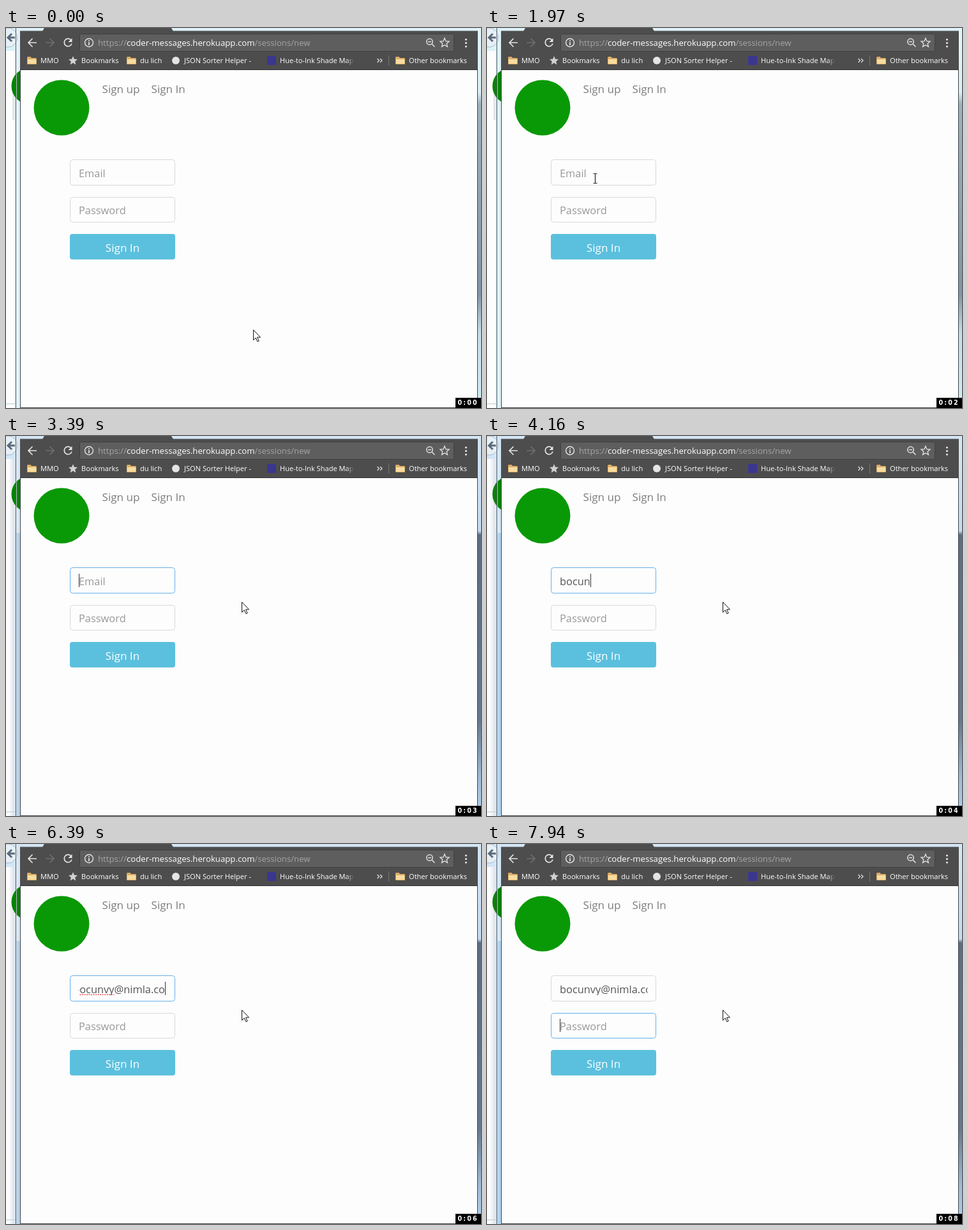
Animation, 744 px wide and 596 px high, one loop 8000 ms. Source, as an HTML page:

```html
<!DOCTYPE html>
<html lang="en">
<head>
<meta charset="utf-8">
<title>Sign in</title>
<style>
  html, body { margin: 0; width: 100%; height: 100%; overflow: hidden; background: #fdfdfd; }
  svg { display: block; }
  text { font-family: "Open Sans", "Noto Sans", sans-serif; white-space: pre; }
  .url { font-size: 13.2px; fill: #a5a5a5; }
  .bookmark { font-size: 11.1px; fill: #fff; }
  .nav { font-size: 17.1px; fill: #7c7c7c; }
  .field { font-size: 16.4px; fill: #999; }
  .typed { fill: #555; }
  .box { fill: #fdfdfd; stroke: #d9d9d9; }
  .box.focus { stroke: #66afe9; }
  .icon { fill: none; stroke: #e4e4e4; stroke-width: 1.7; }
  .clock { font: bold 9.6px "DejaVu Sans", sans-serif; letter-spacing: 2.1px; fill: #fff; }
</style>
</head>
<body>
<svg width="744" height="596" viewBox="0 0 744 596">
  <defs>
    <linearGradient id="idleGlass" x2="0" y2="1">
      <stop stop-color="#e2f5fa"/><stop offset=".17" stop-color="#d9eff6"/>
      <stop offset=".2" stop-color="#9fb2c0"/><stop offset=".7" stop-color="#8195a8"/>
      <stop offset=".8" stop-color="#c4dce8"/><stop offset="1" stop-color="#d3ecf5"/>
    </linearGradient>
    <linearGradient id="activeGlass" x2="0" y2="1">
      <stop stop-color="#d3e6f6"/><stop offset=".25" stop-color="#c4dbf0"/>
      <stop offset=".26" stop-color="#5d6d82"/><stop offset=".75" stop-color="#66788f"/>
      <stop offset=".9" stop-color="#9dbddb"/><stop offset="1" stop-color="#afd0ec"/>
    </linearGradient>
    <linearGradient id="shadow">
      <stop stop-color="#fdfdfd"/><stop offset="1" stop-color="#d9e0e8"/>
    </linearGradient>
    <linearGradient id="fade">
      <stop offset=".9" stop-color="#4d4d4d" stop-opacity="0"/><stop offset="1" stop-color="#4d4d4d"/>
    </linearGradient>
    <clipPath id="emailClip"><rect x="114" y="214" width="137.500" height="23"/></clipPath>
    <g id="folder">
      <path d="M0 1.5q0-1.500 1.500-1.500h4l1.500 2h6.500q1.500 0 1.500 1.500v7.500q0 1-1 1h-13q-1 0-1-1z" fill="#dcae68"/>
      <path d="M1 4h13v7h-13z" fill="#f7dca0"/>
    </g>
    <path id="star" d="M0-7l2 4.700 5 .4-3.800 3.300 1.200 5L0 3.700-4.400 6.400l1.200-5L-7-1.900l5-.4z"/>
  </defs>

  <!-- windows behind the browser -->
  <g id="idleFrame">
    <rect width="744" height="596" fill="#ddf2f8"/>
    <rect x="739" width="5" height="596" fill="url(#idleGlass)"/>
  </g>
  <g id="activeFrame">
    <rect width="744" height="596" fill="#d3e6f6"/>
    <rect x="16" y="152" width="6" height="444" fill="#b2d2ed"/>
    <rect x="739" width="5" height="596" fill="url(#activeGlass)"/>
  </g>
  <path d="M0 36h14v560H0z" fill="#fdfdfd"/>
  <path id="scrollEdge" d="M4 36h10v560H4z" fill="url(#shadow)"/>
  <path d="M10 95h4v49h-4z" fill="#e3e6e9"/>
  <path d="M0 589.5h14" stroke="#b9cbd5"/>
  <circle cx="3" cy="15" r="15" fill="#e6f0f6" stroke="#a9bbc8"/>
  <path d="M14 15H4m5-6-6 6 6 6" fill="none" stroke="#5a6a79" stroke-width="3"/>
  <circle cx="37" cy="91" r="28.500" fill="#088106"/>
  <path d="M15.500 0v596" stroke="#4b545b"/>
  <path d="M16.500 0v596" stroke="#fff" stroke-opacity=".6"/>

  <!-- browser -->
  <path d="M57 5l3-5h199l3 5z" fill="#4d4d4d"/>
  <path d="M22 66h717v530H22z" fill="#3e444a"/>
  <path d="M23 66h715v529H23z" fill="#fdfdfd"/>
  <path d="M22 4.500h717v61.500H22z" fill="#4d4d4d"/>
  <path d="M22 65.500h717" stroke="#343434"/>
  <rect x="115.500" y="9.500" width="586" height="27" rx="2" fill="#5e5e5e" stroke="#414141"/>
  <g class="icon">
    <path d="M48 23H35m6.500-6.500L35 23l6.500 6.500"/>
    <path d="M62 23h13m-6.500-6.500L75 23l-6.500 6.500" stroke="#6f6f6f"/>
    <path d="M102 19a6 6 0 1 0 1 5.500"/>
    <path d="M103.500 16v6h-6z" fill="#e4e4e4" stroke="none"/>
    <circle cx="130" cy="23" r="6.500" stroke-width="1.400"/>
    <path d="M130 19v1.700m0 1.300v5"/>
    <circle cx="663.500" cy="21.500" r="4.700" stroke-width="1.500"/>
    <path d="M661 21.500h5m1 3.500 4.500 4.500" stroke-width="1.500"/>
    <use href="#star" x="687" y="23" stroke-width="1.300"/>
    <path d="M599.500 43v16" stroke="#777" stroke-width="1"/>
    <path d="M581.500 48l3 3-3 3m4.500-6 3 3-3 3" stroke-width="1.200"/>
  </g>
  <g fill="#e4e4e4">
    <circle cx="720.500" cy="18" r="1.600"/><circle cx="720.500" cy="23.500" r="1.600"/><circle cx="720.500" cy="29" r="1.600"/>
    <use href="#star" x="105" y="51" fill="#d2d2d2"/>
    <circle cx="266" cy="51" r="6"/>
  </g>
  <text class="url" x="144" y="28">https://<tspan fill="#fff">coder-messages.herokuapp.com</tspan>/sessions/new</text>
  <use href="#folder" x="33" y="45"/>
  <use href="#folder" x="189" y="45"/>
  <use href="#folder" x="610" y="45"/>
  <rect x="409" y="44" width="14" height="14" fill="#3b3790"/>
  <g class="bookmark">
    <text x="54" y="55">MMO</text>
    <text x="118" y="55">Bookmarks</text>
    <text x="210" y="55">du lich</text>
    <text x="279" y="55">JSON Sorter Helper -</text>
    <text x="429" y="55">Hue-to-Ink Shade Map</text>
    <text x="631" y="55">Other bookmarks</text>
  </g>
  <rect x="279" y="42" width="115" height="18" fill="url(#fade)"/>
  <rect x="429" y="42" width="116" height="18" fill="url(#fade)"/>

  <!-- page -->
  <circle cx="87" cy="125" r="43.500" fill="#0a9906"/>
  <text class="nav" x="150.500" y="102">Sign up</text>
  <text class="nav" x="227.500" y="102">Sign In</text>
  <rect id="emailBox" class="box" x="100.500" y="206.500" width="164" height="40" rx="4"/>
  <rect id="passwordBox" class="box" x="100.500" y="265.500" width="164" height="39" rx="4"/>
  <text id="emailHint" class="field" x="114" y="234">Email</text>
  <g clip-path="url(#emailClip)">
    <g id="emailScroll">
      <text id="email" class="field typed" x="114" y="234"></text>
      <path id="squiggle" stroke="#e33" stroke-width="1.300" stroke-dasharray="2 1.500"/>
    </g>
  </g>
  <text class="field" x="114" y="292">Password</text>
  <rect x="100" y="323" width="165" height="40" rx="4" fill="#5bc0de"/>
  <text class="nav" x="182.500" y="351" text-anchor="middle" style="fill:#fff">Sign In</text>
  <path id="caret" d="M.5 0v21" stroke="#333"/>

  <g id="pointer">
    <path id="arrow" d="M.5.5v16l3.700-3.500 2.700 5.800 2.300-1-2.700-5.700h5z" fill="#fff" stroke="#111"/>
    <path id="beam" d="M-3 -7.500h2.500l.5.500.5-.5h2.500M0-7v14M-3 7.500h2.500L0 7l.5.500h2.500" fill="none" stroke="#222" stroke-width="1.200"/>
  </g>

  <rect x="704" y="580" width="40" height="16"/>
  <text id="clock" class="clock" x="707.500" y="591"></text>
</svg>
<script>
  const LOOP = 8000, FOCUS = 2250, TAB = 7630;
  const ADDRESS = "bocunvy@nimla.com", NAME_LENGTH = 7;
  const keyTimes = [3670, 3800, 3930, 4050, 4160, 4290, 4430, 4740,
    5320, 5450, 5590, 5890, 6010, 6140, 6270, 6390, 6670];
  const tickTimes = [1030, 1970, 2960, 3930, 4890, 5890, 6950, 7940];
  const pointerStops = [
    [0, 387, 473], [120, 378, 508], [260, 345, 560], [390, 320, 577],
    [510, 300, 520], [640, 278, 420], [780, 262, 335], [930, 249, 284],
    [1030, 240, 276], [1150, 230, 268], [1300, 201, 252], [1450, 169, 236],
    [2530, 225, 240], [2680, 310, 252], [2820, 369, 260]
  ];

  const el = Object.fromEntries([...document.querySelectorAll("[id]")].map(node => [node.id, node]));
  const show = (node, visible) => node.setAttribute("visibility", visible ? "visible" : "hidden");
  const move = (node, x, y) => node.setAttribute("transform", `translate(${x} ${y})`);
  const countPast = (times, t) => times.filter(time => time <= t).length;
  const between = (t, from, to) => t >= from && t < to;

  function drawEmail(t) {
    const typed = ADDRESS.slice(0, countPast(keyTimes, t));
    const focused = between(t, FOCUS, TAB);
    el.email.textContent = typed;
    const width = typed ? el.email.getComputedTextLength() : 0;
    const scroll = focused ? Math.max(0, width - 135) : 0;
    move(el.emailScroll, -scroll, 0);
    show(el.emailHint, !typed);
    el.emailBox.classList.toggle("focus", focused);
    el.passwordBox.classList.toggle("focus", t >= TAB);

    const misspelt = between(t, 5040, TAB);
    show(el.squiggle, misspelt);
    if (misspelt) {
      const nameWidth = el.email.getSubStringLength(0, NAME_LENGTH);
      el.squiggle.setAttribute("d", `M114 236.300h${nameWidth}`);
    }

    show(el.caret, t >= FOCUS && !between(t, 2960, 3390) && !between(t, 7230, TAB));
    if (t >= TAB) move(el.caret, 114, 274);
    else move(el.caret, Math.round(114 + width - scroll), 216);
  }

  function drawPointer(t) {
    const [, x, y] = pointerStops.findLast(stop => stop[0] <= t);
    const overField = between(x, 100, 265) && (between(y, 206, 247) || between(y, 265, 305));
    show(el.beam, overField);
    show(el.arrow, !overField);
    move(el.pointer, overField ? x + .5 : x, y);
  }

  function draw(t) {
    const active = t >= FOCUS;
    show(el.idleFrame, !active);
    show(el.activeFrame, active);
    show(el.scrollEdge, active);
    drawEmail(t);
    drawPointer(t);
    el.clock.textContent = "0:0" + countPast(tickTimes, t);
  }

  const start = performance.now();
  function frame() {
    draw((performance.now() - start) % LOOP);
    requestAnimationFrame(frame);
  }
  frame();
</script>
</body>
</html>
```
